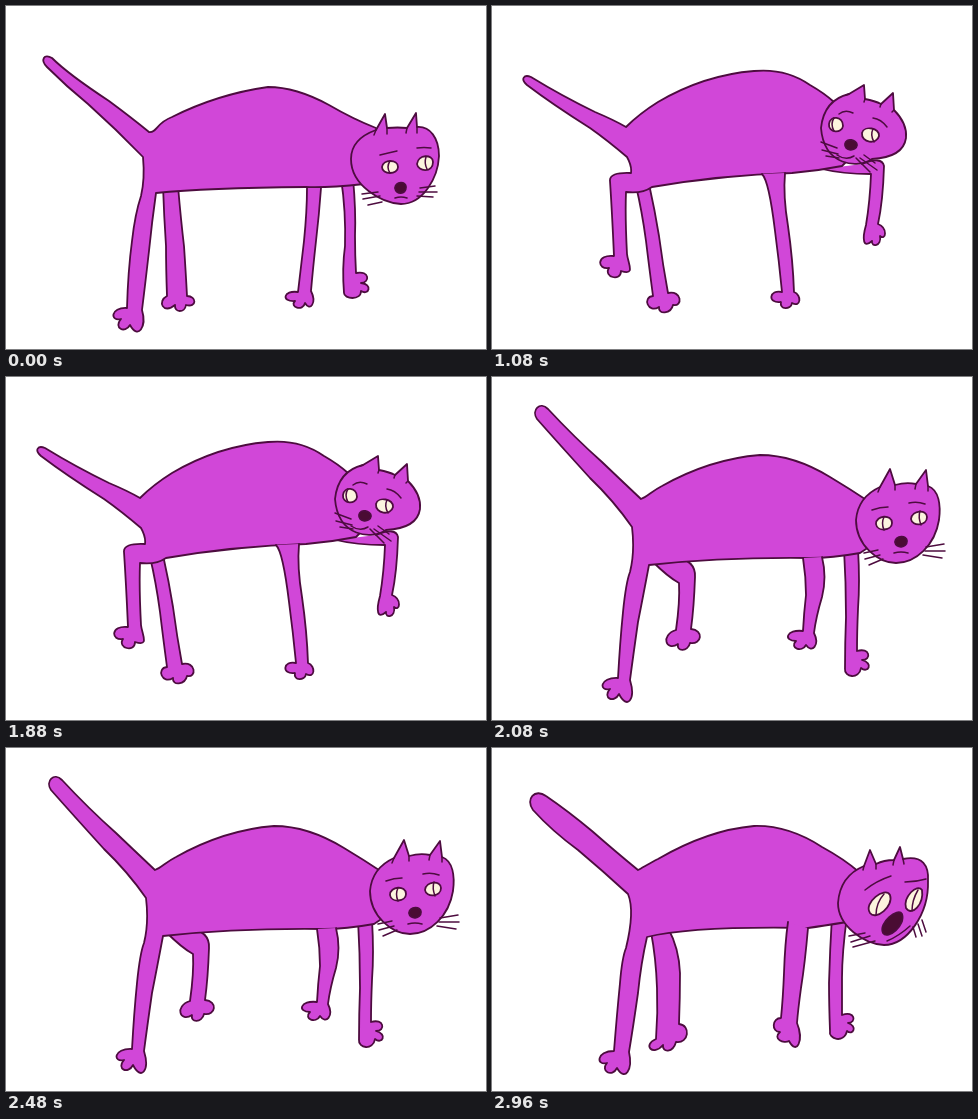
An HTML page without scripts for the animation above (3040 ms loop, 480 by 343 pixels).

```html
<!DOCTYPE html>
<html lang="en">
<head>
<meta charset="utf-8">
<title>Dancing cat</title>
<style>
html, body { margin: 0; width: 100%; height: 100%; overflow: hidden; background: #fff; }
svg { display: block; width: 100%; height: 100%; }

/* Poses: a = standing, b = startled, c = leaning left, d = leaning right */
path {
  d: var(--a);
  fill: #d147d8;
  stroke: #4d0c3f;
  stroke-width: 1.8;
  stroke-linejoin: round;
  stroke-linecap: round;
  animation: dance 3.04s infinite;
}
.eye { fill: #fcf4de; }
.nose { fill: #4a0c33; }
.lines { fill: none; stroke-width: 1.5; }

/* steps(1, jump-both) holds the halfway shape for one 40 ms beat */
@keyframes dance {
  0% { d: var(--a); animation-timing-function: step-end; }
  26.315%, 97.368% { d: var(--b); animation-timing-function: step-end; }
  27.631% { d: var(--b); animation-timing-function: steps(1, jump-both); }
  28.947%, 42.105%, 55.263%, 68.421%, 81.578%, 94.736% {
    d: var(--d); animation-timing-function: step-end;
  }
  34.21%, 47.368%, 60.526%, 73.684%, 86.842%, 96.052% {
    d: var(--d); animation-timing-function: steps(1, jump-both);
  }
  35.526%, 48.684%, 61.842%, 74.999%, 88.157% {
    d: var(--c); animation-timing-function: step-end;
  }
  40.789%, 53.947%, 67.105%, 80.263%, 93.421% {
    d: var(--c); animation-timing-function: steps(1, jump-both);
  }
  100% { d: var(--b); }
}

.far-hind {
  --a: path("M172,180 Q175,215 178,240 Q180,270 181,290 C191,290 191,302 180,299 C179,307 168,307 169,299 C157,309 151,295 161,290 Q160,262 160,240 Q158,210 157,180");
  --b: path("M176,180 Q187,200 188,225 Q188,250 187,276 C199,277 197,296 184,294 C181,305 170,305 171,297 C161,309 150,297 164,291 Q166,265 165,240 Q164,210 159,184");
  --c: path("M157,178 Q163,205 167,230 Q171,260 176,287 C190,284 191,301 181,299 C179,308 166,309 167,301 C156,308 150,291 161,290 Q157,260 154,235 Q150,205 144,180");
  --d: path("M182,180 Q204,183 203,200 Q202,230 199,252 C212,253 210,268 198,266 C196,275 184,275 186,267 C174,275 168,258 184,253 Q188,225 187,206 Q176,200 160,184");
}
.far-front {
  --a: path("M347,172 Q350,205 349,230 Q349,250 350,267 C364,264 364,277 355,277 C367,278 363,290 355,285 C355,295 338,293 338,287 Q336,262 339,240 Q340,205 335,172");
  --b: path("M355,168 Q350,205 350,230 Q350,250 350,267 C363,262 365,275 356,275 C366,278 361,288 355,283 C352,296 336,291 338,283 Q337,255 337,235 Q338,200 340,168");
  --c: path("M370,158 Q390,150 392,160 Q391,195 386,218 C396,222 394,235 388,230 C390,240 379,242 380,235 C371,243 370,233 374,219 Q378,195 379,168 Q350,168 330,163");
  --d: path("M366,172 Q368,205 366,232 Q365,255 365,274 C378,270 380,283 370,283 C382,286 376,297 369,291 C367,303 352,300 353,292 Q353,265 354,240 Q354,205 352,172");
}
.body {
  --a: path("M137,151 Q110,123 82,98 Q61,81 41,61 C34,54 38,47 46,52 Q62,68 103,95 Q126,112 143,126 C151,127 150,117 166,111 Q212,88 262,81 Q290,81 323,99 Q347,113 370,122 L380,160 L358,178 Q320,182 300,181 Q200,182 150,187 Q146,215 143,245 Q139,280 136,304 C141,321 132,334 124,319 C119,328 107,322 115,313 C104,316 104,301 121,302 Q122,265 126,235 Q129,208 135,190 Q139,173 137,151 Z");
  --b: path("M136,146 Q111,123 86,102 Q60,83 41,62 C33,51 43,40 54,48 Q76,63 100,83 Q124,104 146,122 C150,120 158,115 166,111 Q216,82 262,78 Q296,77 330,99 Q352,111 367,124 L380,160 L355,174 Q330,178 316,180 Q200,178 155,189 Q149,215 146,245 Q141,280 137,304 C141,322 133,334 125,320 C120,330 108,323 115,315 C104,318 104,303 122,303 Q125,265 128,235 Q130,210 134,200 Q143,163 136,146 Z");
  --c: path("M135,151 Q115,134 98,122 Q60,98 35,79 C28,73 32,68 39,71 Q70,90 103,106 Q122,114 134,121 C140,115 150,106 166,96 Q212,69 262,65 Q294,62 318,79 Q332,87 342,96 L370,140 L350,160 Q325,165 300,167 Q230,169 160,181 Q150,188 134,186 Q133,210 135,248 C136,258 144,270 129,265 C129,276 111,271 117,262 C105,264 104,248 122,250 Q120,205 118,175 Q117,166 139,167 Q140,160 135,151 Z");
  --d: path("M140,150 Q122,124 98,101 Q68,68 45,42 C39,33 48,24 56,32 Q82,60 110,85 Q132,106 149,122 C155,120 160,114 170,109 Q218,82 268,78 Q302,78 338,100 Q358,112 376,124 L392,160 L368,176 Q340,181 318,181 Q230,180 157,188 Q150,225 146,245 Q141,280 138,303 C144,323 135,333 127,317 C122,327 110,321 118,312 C107,315 107,300 126,301 Q128,265 131,235 Q134,205 138,195 Q143,175 140,150 Z");
}
.near-front {
  --a: path("M315,182 Q313,210 310,235 Q307,262 305,285 C311,297 304,306 299,297 C297,306 283,301 289,295 C275,296 277,284 292,286 Q295,260 298,235 Q301,205 301,182");
  --b: path("M316,180 Q313,215 309,240 Q306,262 305,275 C312,292 305,308 297,293 C292,296 280,291 288,284 C279,284 280,270 289,270 Q291,250 292,225 Q293,195 296,174");
  --c: path("M293,167 Q291,190 296,220 Q301,255 302,286 C310,289 309,302 300,297 C299,304 287,304 289,296 C275,298 277,283 290,286 Q287,255 283,225 Q277,175 270,168");
  --d: path("M330,180 Q335,200 330,220 Q324,240 322,256 C328,268 320,277 314,268 C310,276 297,271 304,264 C291,264 294,252 311,254 Q312,235 314,218 Q314,200 311,181");
}
.head {
  --a: path("M345,153 Q345,133 370,124 L379,108 L381,122 Q392,121 401,122 L410,107 L411,121 C424,120 433,132 433,150 C432,172 417,198 395,198 C376,197 345,180 345,153 Z");
  --b: path("M346,155 Q348,128 372,118 L378,102 L384,116 Q392,112 402,112 L408,99 L411,111 C431,107 437,118 436,133 C437,166 415,197 392,197 C372,196 346,178 346,155 Z");
  --c: path("M329,122 Q332,94 357,88 L372,79 L373,93 Q383,95 389,98 L401,87 L402,104 C410,112 415,122 414,132 C412,146 398,152 380,153 C366,163 332,160 329,122 Z");
  --d: path("M364,143 Q366,120 388,110 L398,92 L403,108 Q414,105 424,107 L434,93 L436,109 C447,113 449,128 447,143 C443,168 424,186 404,186 C386,186 364,168 364,143 Z");
}
.left.eye {
  --a: path("M376,161 C377,153 392,153 392,161 C392,169 376,169 376,161 Z");
  --b: path("M378,165 C371,155 393,138 398,147 C402,158 384,173 378,165 Z");
  --c: path("M337,118 C338,109 351,110 351,120 C350,128 336,127 337,118 Z");
  --d: path("M384,147 C384,138 400,137 400,146 C400,154 385,155 384,147 Z");
}
.right.eye {
  --a: path("M411,158 C412,148 427,148 427,156 C427,167 412,166 411,158 Z");
  --b: path("M414,160 C411,149 425,135 430,142 C432,156 420,169 414,160 Z");
  --c: path("M370,127 C372,119 388,122 387,130 C385,139 369,137 370,127 Z");
  --d: path("M419,142 C420,133 435,132 435,140 C435,149 420,150 419,142 Z");
}
.nose {
  --a: path("M389,182 C390,175 400,175 400,181 C400,189 390,189 389,182 Z");
  --b: path("M391,185 C386,175 406,159 410,166 C414,177 396,192 391,185 Z");
  --c: path("M353,138 C354,131 365,134 365,139 C364,146 352,145 353,138 Z");
  --d: path("M403,165 C404,158 415,158 415,164 C415,171 404,172 403,165 Z");
}
/* ear creases, brows, pupils, mouth */
.face {
  --a: path("M370,124 L368,129 M381,122 L381,128 M401,122 L400,127 M411,121 L411,127 M374,149 Q382,147 391,145 M411,142 Q418,141 425,142 M384,155 Q380,161 384,167 M420,151 Q418,157 421,163 M389,192 Q395,190 401,192");
  --b: path("M372,118 L371,122 M384,116 L384,121 M402,112 L401,117 M411,111 L412,116 M373,142 Q384,133 399,128 M413,134 Q424,134 434,131 M392,146 Q384,155 384,167 M426,142 Q420,152 420,163 M395,193 Q407,188 418,178");
  --c: path("M357,88 L354,89 M373,93 L372,96 M389,98 L388,101 M402,104 L400,106 M347,108 Q353,103 361,107 M381,112 Q389,113 395,121 M342,112 Q338,118 342,125 M381,123 Q378,129 382,136 M345,149 Q354,155 362,150");
  --d: path("M388,110 L386,115 M403,108 L403,113 M424,107 L423,112 M436,109 L436,114 M380,133 Q388,130 396,130 M417,126 Q425,124 433,127 M392,140 Q389,146 392,153 M428,134 Q426,140 429,148 M402,176 Q409,174 416,176");
}
.whiskers {
  --a: path("M356,188 L372,186 M357,193 L374,190 M362,199 L376,196 M414,182 L429,180 M413,186 L431,186 M411,190 L427,191");
  --b: path("M357,188 L373,185 M359,194 L378,188 M361,199 L383,193 M430,172 L434,184 M426,176 L430,188 M421,179 L424,189");
  --c: path("M329,136 L345,142 M330,144 L346,148 M334,150 L347,152 M364,152 L378,166 M368,152 L385,164 M372,149 L383,157");
  --d: path("M372,176 L386,173 M373,182 L388,178 M377,188 L391,182 M434,170 L452,167 M433,174 L453,174 M431,178 L450,181");
}
</style>
</head>
<body>
<svg viewBox="0 0 480 343" preserveAspectRatio="none">
  <path class="far-hind"/>
  <path class="far-front"/>
  <path class="body"/>
  <path class="near-front"/>
  <path class="head"/>
  <path class="left eye"/>
  <path class="right eye"/>
  <path class="nose"/>
  <path class="lines face"/>
  <path class="lines whiskers"/>
</svg>
</body>
</html>
```
